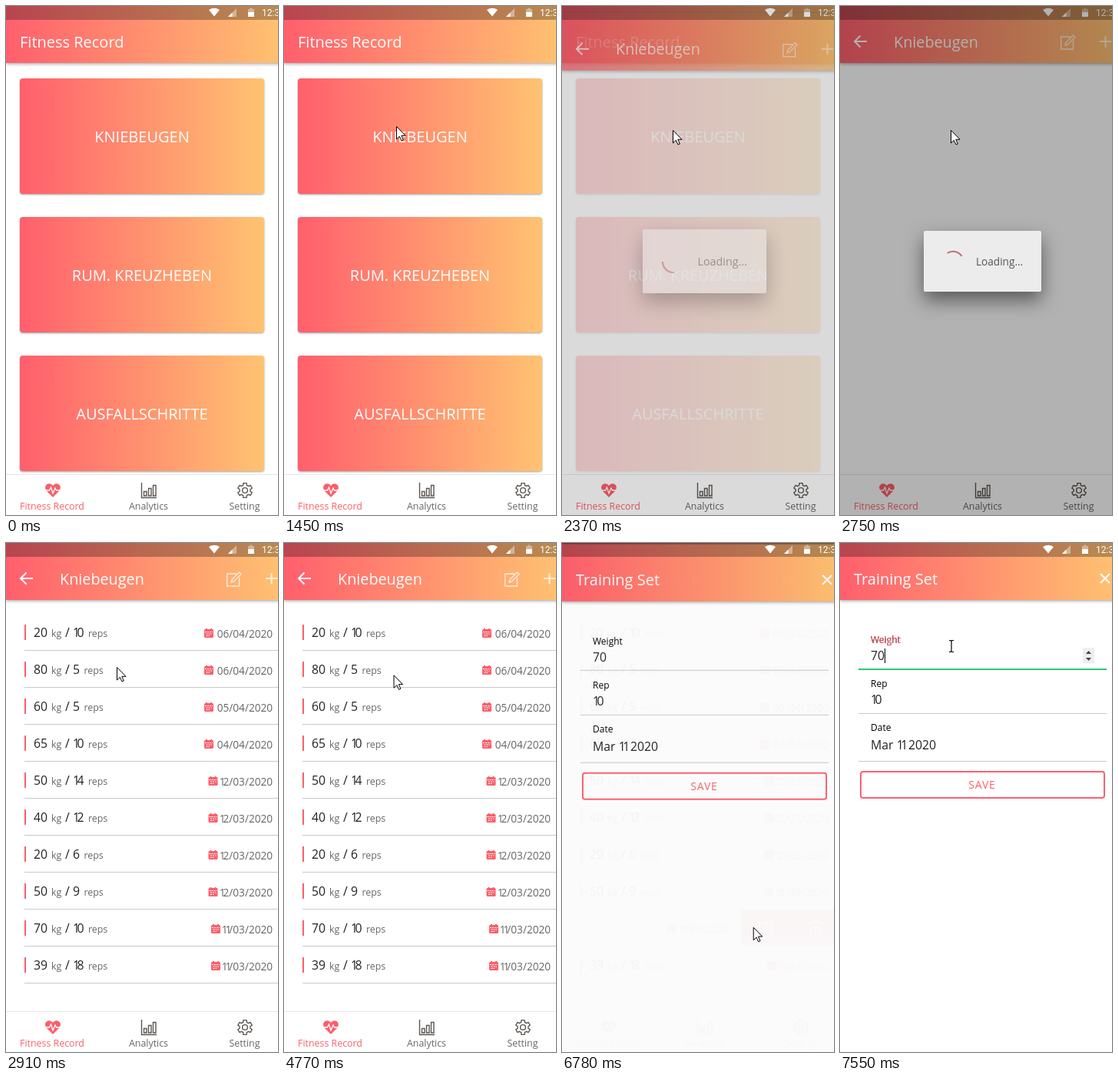
An HTML page that plays this animation: 354 px wide and 661 px high, repeating every 8000 ms.

```html
<!DOCTYPE html>
<html lang="en">
<head>
<meta charset="utf-8">
<title>Fitness Record</title>
<style>
html, body { margin: 0; width: 354px; height: 661px; overflow: hidden; background: #fff; }
svg { display: block; font: 16px "Open Sans", "Noto Sans", sans-serif; }
.bar { fill: url(#warm); filter: drop-shadow(0 1px 2px rgba(0,0,0,.4)); }
.card { fill: url(#warm); filter: drop-shadow(0 1.5px 1px rgba(0,0,0,.38)); }
.box { fill: #ececec; filter: drop-shadow(0 11px 12px rgba(0,0,0,.5)); }
.title { font-size: 20px; fill: #fff; }
.mid { text-anchor: middle; }
.small { font-size: 12.4px; fill: #666; }
.label { font-size: 12px; }
.value { font-size: 15.8px; fill: #222; }
.date { font-size: 13.6px; fill: #666; text-anchor: end; }
.pink { fill: #fb5f6a; }
.line { fill: none; stroke: #c9c9c9; }
.icon { fill: none; stroke: #fff; stroke-width: 2; }
.thin { stroke-width: 1.4; }
.tab { fill: none; stroke: #5c5651; stroke-width: 1.4; }
</style>
</head>
<body>
<svg id="stage" width="354" height="661" viewBox="0 0 354 661"></svg>
<script>
const LOOP = 8000;
// Bursts of movement: start, end, number of steps
const bursts = [[360, 820, 7], [1140, 1450, 5], [1680, 1910, 4], [2290, 2910, 9],
  [4770, 5540, 11], [5620, 6400, 11], [6630, 7390, 11], [7470, 7550, 2]];
// Pointer path: time, x, y
const path = [[360, 314, 492], [580, 248, 280], [820, 199, 133], [1060, 199, 133],
  [1450, 146, 156], [1603, 146, 156], [1757, 132, 149], [1910, 144, 161],
  [4693, 144, 161], [4850, 141, 182], [5160, 160, 340], [5540, 199, 501],
  [5854, 69, 534], [6088, 177, 501], [6400, 249, 500], [6780, 249, 500],
  [7080, 205, 310], [7390, 145, 134]];
const sets = [[20, 10, '06/04'], [80, 5, '06/04'], [60, 5, '05/04'], [65, 10, '04/04'], [50, 14, '12/03'],
  [40, 12, '12/03'], [20, 6, '12/03'], [50, 9, '12/03'], [70, 10, '11/03'], [39, 18, '11/03']];
const SWIPED = 8;

const text = (x, y, s, cls, extra = '') => `<text x="${x}" y="${y}" class="${cls}" ${extra}>${s}</text>`;
// Tightens the space after every narrow 1
const num = (x, y, s, cls) => {
  const dx = [...String(s)].map((c, i, a) => a[i - 1] === '1' ? '-.22em' : '0').join(' ');
  return text(x, y, s, cls, `dx="${dx}"`);
};
const hline = (x, y, end = 347) => `<path class="line" d="M${x} ${y}H${end}"/>`;
const header = '<rect class="bar" width="364" height="74"/>';
const edit = (x, y, cls = '') => `<path class="icon thin ${cls}" transform="translate(${x} ${y})"
  d="M4 -7H-8.3V9H7.5V-2M-3 4L-2 .5L7.5 -9L10 -6.5L.5 3Z"/>`;

const card = (name, i) => `<rect class="card" x="18" y="${94 + 180 * i}" width="318" height="150" rx="4"/>`
  + text(177, 177 + 180 * i, name, 'title mid');

const calendar = x => `<g transform="translate(${x} 111)"><rect y="1" width="12" height="11" rx="1.5" class="pink"/>
  <path d="M3 0V3M9 0V3" stroke="#fb5f6a" stroke-width="2"/>
  <path d="M1 4.5H11M2.5 7H10M2.5 9.5H7" stroke="#fff" stroke-dasharray="2 1"/></g>`;

function row([kg, reps, day], i) {
  const ones = day.split('1').length - 1;
  const item = `<rect x="8" y="92" width="356" height="48" fill="#fff"/>
    <rect x="24" y="106" width="2" height="20" class="pink"/>`
    + num(36, 122, kg, 'value') + text(59, 122, 'kg', 'small') + text(77, 122, '/', 'value')
    + num(87, 122, reps, 'value') + text(reps > 9 ? 107 : 101.5, 122, 'reps', 'small')
    + calendar([258, 263.5, 267][ones]) + num(347, 123, day + '/2020', 'date') + hline(24, 139.5, 364);
  const body = i === SWIPED
    ? `<g clip-path="url(#slot)"><rect x="234" y="92" width="130" height="47" fill="#ff5f6d"/>
       ${edit(265, 116)}<path class="icon thin" d="M321 109H340M327 109V106H334V109M323 109L324.500 127H336.500L338 109M327.500 112.500V123.500M330.500 112.500V123.500M333.500 112.500V123.500"/>
       <g id="swipe">${item}</g></g>`
    : item;
  return `<g transform="translate(0 ${48 * i})">${body}</g>`;
}

const gear = () => {
  const pts = [];
  for (let i = 0; i < 6; i++)
    for (const [a, r] of [[-.34, 7], [-.22, 9.6], [.22, 9.6], [.34, 7]]) {
      const w = i * Math.PI / 3 + Math.PI / 6 + a;
      pts.push((311 + r * Math.cos(w)).toFixed(1) + ',' + (629 + r * Math.sin(w)).toFixed(1));
    }
  return `<polygon class="tab" stroke-linejoin="round" points="${pts.join(' ')}"/><circle class="tab" cx="311" cy="629" r="3.4"/>`;
};

const tabs = `<rect y="608" width="354" height="53" fill="#fff"/><path d="M0 608.500H354" stroke="#e6e6e6"/>
  <path class="pink" d="M61 638L53 630C47 622 57 616.500 61 623C65 616.500 75 622 69 630Z"/>
  <path d="M51 629H56.500L58.500 625L61 633L64 626L65.500 629H71" fill="none" stroke="#fff" stroke-width="1.3"/>
  <path class="tab" d="M176.500 619V638.500H196M179.500 636V630.500H183V636ZM185.500 636V626.500H189V636ZM191.500 636V622.500H195V636Z"/>`
  + gear() + text(60, 654, 'Fitness Record', 'small mid pink', 'style="fill:#fb5f6a"')
  + text(185.5, 654, 'Analytics', 'small mid') + text(310.5, 654, 'Setting', 'small mid');

const status = `<rect width="354" height="18" fill="#000" opacity=".28"/>
  <path d="M264 5Q271 .5 278 5L271 13.500Z" fill="#fff"/>
  <path d="M300 3V14H289Z" fill="#fff" opacity=".4"/><path d="M294.500 8.500V14H289Z" fill="#fff"/>
  <path d="M315 4H317.500V2.500H320.500V4H323V8H315Z" fill="#fff" opacity=".4"/><path d="M315 8H323V14H315Z" fill="#fff"/>`
  + text(333, 12.7, '12:3', '', 'fill="#fff" style="font:12px Roboto,sans-serif"');

const form = `<rect width="354" height="661" fill="#fff"/>${header}` + text(18, 53.5, 'Training Set', 'title')
  + '<path class="icon" d="M339 40L351 52M351 40L339 52"/>'
  + text(40, 130, 'Weight', 'label') + num(40, 152, 70, 'value') + hline(24, 163.5)
  + text(40, 187, 'Rep', 'label') + num(40, 209, 10, 'value') + hline(24, 221.5)
  + text(40, 244, 'Date', 'label') + num(40, 268, 'Mar 11 2020', 'value') + hline(24, 283.5)
  + `<g id="focus">${text(40, 130, 'Weight', 'label', 'fill="#ff5f6d"')}
     <rect x="24" y="163" width="323" height="2" fill="#2dc873"/>
     <rect x="316" y="136" width="15" height="20" fill="#eee"/>
     <path d="M320 144L323.500 140L327 144ZM320 149L323.500 153L327 149Z" fill="#444"/></g>
     <path id="caret" d="M58.500 137V156" stroke="#000"/>
     <rect x="27" y="297" width="317" height="34" rx="3" fill="none" stroke="#ff5f6d" stroke-width="2"/>`
  + text(185, 319, 'SAVE', 'mid pink', 'font-size="14" letter-spacing=".8"');

const $ = id => document.getElementById(id);
$('stage').innerHTML = `<defs>
  <linearGradient id="warm"><stop stop-color="#ff5f6d"/><stop offset="1" stop-color="#ffc371"/></linearGradient>
  <clipPath id="slot"><rect x="8" y="92" width="356" height="48"/></clipPath></defs>
  <g id="home">${header}${text(18, 53.5, 'Fitness Record', 'title')}
    ${['KNIEBEUGEN', 'RUM. KREUZHEBEN', 'AUSFALLSCHRITTE'].map(card).join('')}</g>
  <g id="list"><rect width="354" height="661" fill="#fff"/>${header}
    <path class="icon" d="M35 46H19M26.500 38.500L19 46L26.500 53.500"/>
    ${text(70, 53.5, 'Kniebeugen', 'title', 'style="font-size:19.8px"')}
    <g opacity=".75">${edit(296, 47)}<path class="icon" d="M338 46H353M345.500 39V53.500"/></g>
    <g id="rows">${sets.map(row).join('')}</g></g>
  <g>${tabs}</g>
  <rect id="shade" width="354" height="661"/>
  <g id="form">${form}</g>
  <g>${status}</g>
  <rect id="dim" width="354" height="661"/>
  <g id="loading"><rect class="box" x="109" y="292" width="153" height="79" rx="2"/>
    <path id="spin" d="M139.500 321A13.500 13.500 0 0 1 158.500 325" fill="none" stroke="#b8746c" stroke-width="2"/>
    ${text(177, 336.5, 'Loading...', '', 'font-size="13.6" fill="#555"')}</g>
  <path id="arrow" d="M.5 .5V17L4.300 13.300L7 19L9.300 18L6.800 12.300H12Z" fill="#fff" stroke="#000"/>
  <path id="beam" d="M-3 -7.500H-1L0 -6.500L1 -7.500H3M0 -6.500V6.500M-3 7.500H-1L0 6.500L1 7.500H3" fill="none" stroke="#000" stroke-width="1.200"/>`;

const clamp = v => Math.max(0, Math.min(1, v));
const easeOut = p => 1 - (1 - clamp(p)) ** 3;
const set = (id, attrs) => { for (const k in attrs) $(id).setAttribute(k, attrs[k]); };

// The screen refreshes only in the steps of each burst
function stepped(t) {
  let q = 0;
  for (const [a, b, n] of bursts) {
    if (t < a) break;
    const d = (b - a) / (n - 1);
    q = Math.min(b, a + Math.floor((t - a) / d + .02) * d);
  }
  return q;
}

function pointer(t) {
  const i = path.findIndex(k => k[0] > t);
  if (i < 0) return path[path.length - 1].slice(1);
  if (i === 0) return path[0].slice(1);
  const [a, x, y] = path[i - 1], [b, u, v] = path[i], p = (t - a) / (b - a);
  return [x + (u - x) * p, y + (v - y) * p];
}

function slideIn(id, p) {
  set(id, { opacity: p, transform: `translate(0 ${40 * (1 - p)})`, display: p ? 'inline' : 'none' });
}

function draw(t) {
  const q = stepped(t);

  slideIn('list', q < 2290 ? 0 : easeOut((q - 2262) / 280));
  set('rows', { display: q > 2800 ? 'inline' : 'none' });
  document.querySelectorAll('#rows .value').forEach(e => e.style.fill = q >= 5620 ? '#000' : '#222');
  set('swipe', { transform: `translate(${-130 * clamp((q - 5540) / 314)} 0)` });

  const enter = q < 2290 ? 0 : clamp((q - 2272) / 200);
  const leave = clamp((q - 2755) / 155);
  const shown = enter * (1 - leave), scale = 1.1 - .1 * enter - .1 * leave;
  set('dim', { opacity: .3 * shown });
  set('loading', { opacity: shown, transform: `translate(185.500 331.500) scale(${scale}) translate(-185.500 -331.500)` });
  set('spin', { transform: `rotate(${(q - 2677.5) * .48} 147 332)` });

  const modal = q < 6630 ? 0 : easeOut((q - 6602) / 280);
  set('shade', { opacity: .32 * modal });
  slideIn('form', modal);
  set('focus', { opacity: q < 7470 ? 0 : q < 7550 ? .5 : 1 });
  set('caret', { opacity: q < 7550 ? 0 : 1 });

  const [x, y] = pointer(q), typing = modal === 1 && y < 165;
  set('arrow', { transform: `translate(${x} ${y})`, opacity: q < 360 || typing ? 0 : 1 });
  set('beam', { transform: `translate(${x} ${y})`, opacity: typing ? 1 : 0 });
}

const start = performance.now();
(function tick() {
  draw((performance.now() - start) % LOOP);
  requestAnimationFrame(tick);
})();
</script>
</body>
</html>
```
